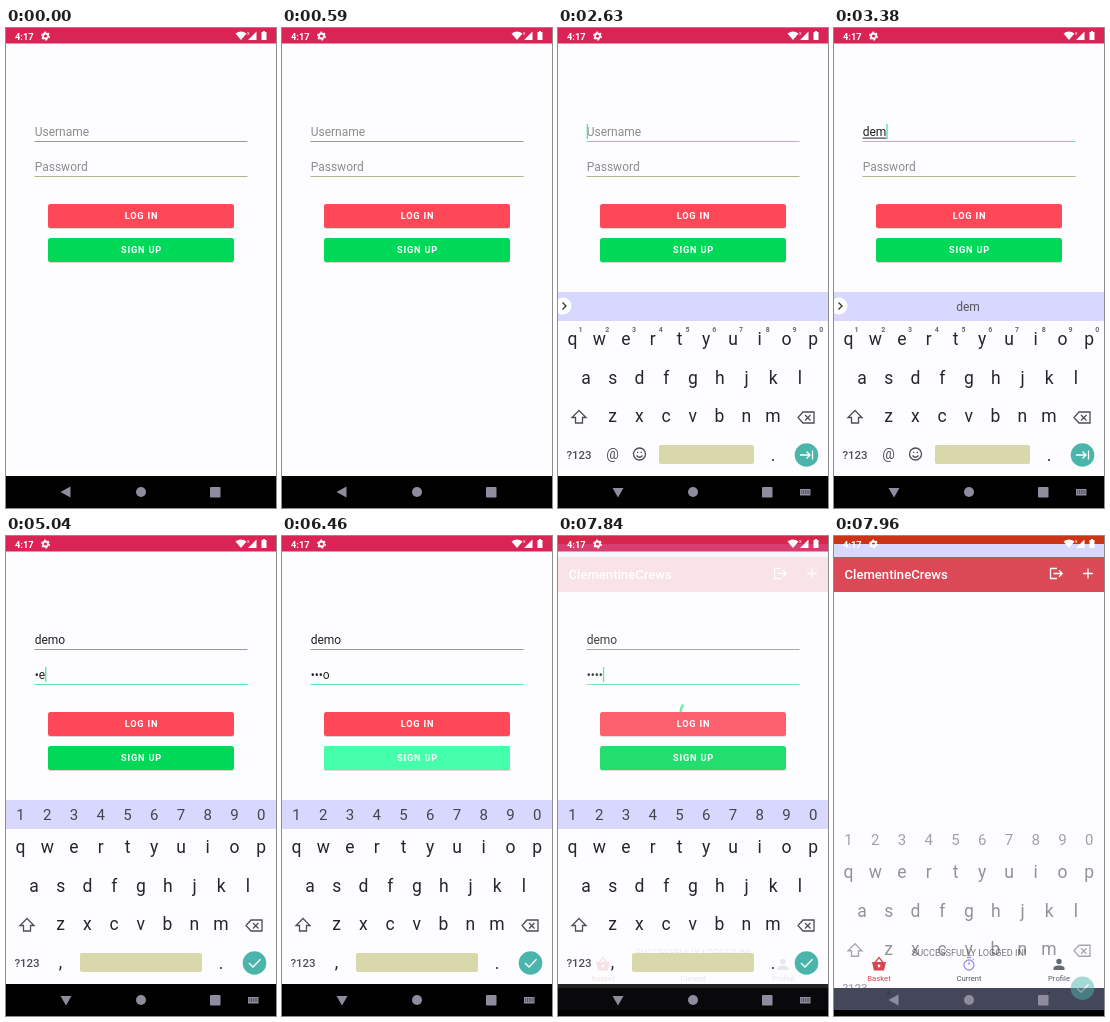
These frames come from a looping animation (270x480 px, 8000 ms). An HTML page:

```html
<!DOCTYPE html>
<html lang="en">
<head>
<meta charset="utf-8">
<title>Log in</title>
<style>
html, body { margin: 0; height: 100%; overflow: hidden; background: #fdfdff; }
svg { display: block; width: 100vw; height: 100vh; font-family: Roboto, Arial, sans-serif; }
.mid { text-anchor: middle; }
.bold { font-weight: 500; }
.line { fill: none; stroke-width: 1.3; }
.field { font-size: 12px; }
.button { font-size: 9.2px; font-weight: 700; letter-spacing: .82px; fill: #fff; }
.key { font-size: 17.5px; fill: #23262b; }
.digit { font-size: 15px; fill: #43444e; }
.hint { font-size: 7px; font-weight: 700; fill: #666879; }
.tab { font-size: 7.7px; }
</style>
</head>
<body>
<svg viewBox="0 0 270 480">
  <defs><clipPath id="clip"><rect id="clipBox" width="270" height="448"/></clipPath></defs>

  <g id="login">
    <rect width="270" height="480" fill="#fdfdff"/>
    <rect width="270" height="15.5" fill="#da2456"/>
    <path id="spinner" fill="none" stroke="#5deaa2" stroke-width="2.6"/>
    <text id="user" class="field" x="28.7" y="108"/>
    <text id="pass" class="field" x="28.7" y="143"/>
    <rect id="userLine" x="28.5" y="113" width="213" height="1"/>
    <rect id="passLine" x="28.5" y="148" width="213" height="1"/>
    <rect id="composing" x="28.7" y="109.6" height="1" fill="#222"/>
    <rect id="caret" width="1.3" height="15" fill="#4fe39b"/>
    <g fill="#000" opacity=".14">
      <rect x="42" y="177" width="186" height="24" rx="2.5"/>
      <rect x="42" y="211" width="186" height="24" rx="2.5"/>
    </g>
    <rect x="42" y="176" width="186" height="24" rx="2.5" fill="#ff4857"/>
    <rect x="42" y="210" width="186" height="24" rx="2.5" fill="#00d957"/>
    <rect id="press" x="42" y="210" width="186" height="24" rx="2.5" fill="#45ffab"/>
    <text class="button mid" x="135.5" y="191.3">LOG IN</text>
    <text class="button mid" x="135.5" y="225.3">SIGN UP</text>
    <rect y="448" width="270" height="32"/>
  </g>

  <g id="home">
    <rect width="270" height="480" fill="#fdfdff"/>
    <rect width="270" height="8" fill="#cb3414"/>
    <rect y="8" width="270" height="13" fill="#d8d8fc"/>
    <rect y="21" width="270" height="35" fill="#da4955"/>
    <text class="bold" x="10.5" y="42.5" font-size="13.1" fill="#fff">ClementineCrews</text>
    <g class="line" stroke="#fff">
      <path d="M223 32.5H216.5V42.5H223M219.5 37.5H228M225 34.2L228.3 37.5 225 40.8M249 37.5H259M254 32.5V42.5"/>
    </g>
    <rect y="452" width="270" height="22" fill="#44465a"/>
    <rect y="474" width="270" height="6"/>
    <text class="mid" x="135" y="420" font-size="9.1" fill="#777">SUCCESSFULLY LOGGED IN!</text>
    <path d="M38 426H52L50 434.5H40Z" fill="#d84450"/>
    <path class="line" d="M41 426.500L45 421.500 49 426.500" stroke="#d84450"/>
    <circle cx="45" cy="430" r="1.4" fill="#fff"/>
    <path class="line" d="M133 421.5H137M135 426V429M139 424L140 423" stroke="#9696e8"/>
    <circle class="line" cx="135" cy="429" r="5" stroke="#9696e8"/>
    <circle cx="225" cy="425.500" r="2.7" fill="#666a75"/>
    <path d="M219.500 434V432C219.500 428.500 230.500 428.500 230.500 432V434Z" fill="#666a75"/>
    <text class="tab mid" x="45" y="445" fill="#d84450">Basket</text>
    <text class="tab mid" x="135" y="445" fill="#555a66">Current</text>
    <text class="tab mid" x="225" y="445" fill="#555a66">Profile</text>
  </g>

  <g clip-path="url(#clip)"><g id="keyboard">
    <rect id="strip" y="264" width="270" height="29" fill="#d8d8fe"/>
    <g id="letters"></g>
    <g class="line" stroke="#4b4e56">
      <path d="M21 382.500L28 389.500H24.500V395H17.500V389.500H14Z"/>
      <path d="M245 384H256V395H245L240 389.500ZM247 387L252.500 392.500M252.500 387L247 392.500"/>
    </g>
    <text class="mid bold" x="21" y="430.500" font-size="11.5" fill="#4b4e56">?123</text>
    <text class="key mid" x="215" y="433" fill="#4b4e56">.</text>
    <rect id="space" y="417" height="19" rx="2" fill="#d9d8ab"/>
    <circle cx="248.500" cy="427" r="11.8" fill="#4bb5ab"/>
    <g id="textMode">
      <g id="hints"></g>
      <circle cx="5" cy="278" r="8.500" fill="#fff"/>
      <path class="line" d="M4.500 274.500L8 278 4.500 281.500" stroke="#333"/>
      <text id="suggest" class="mid" x="134" y="282.500" font-size="12" fill="#55565e"/>
      <text class="mid" x="54.500" y="431" font-size="14" fill="#4b4e56">@</text>
      <g class="line" stroke="#4b4e56">
        <circle cx="81.500" cy="426" r="6"/>
        <path d="M78.500 427.500Q81.500 431 84.500 427.500M79 424.300H80.300M82.700 424.300H84"/>
      </g>
      <path class="line" d="M242 427H252M248.500 423.500L252 427 248.500 430.500M254.500 422.500V431.500" stroke="#fff" stroke-width="1.5"/>
    </g>
    <g id="passMode">
      <g id="digits"></g>
      <text class="key mid" x="54.500" y="432" fill="#4b4e56">,</text>
      <path class="line" d="M243 427L247 431 254.500 423.300" stroke="#fff"/>
    </g>
  </g></g>

  <g fill="#fff">
    <text x="9" y="11.500" font-size="9.300" font-weight="700">4:17</text>
    <circle cx="39.500" cy="8" r="2.500" fill="none" stroke="#fff" stroke-width="1.800"/>
    <circle cx="39.500" cy="8" r="3.800" fill="none" stroke="#fff" stroke-width="1.300" stroke-dasharray="2 1.980"/>
    <path d="M229.500 5.500Q235 1.500 240.500 5.500L235 12ZM242 12L250.500 3.500V12ZM255.500 4H257V3H259V4H260.500V12H255.500Z"/>
    <text x="241" y="7" font-size="5">x</text>
  </g>
  <g fill="#8f8c9f">
    <path id="back"/>
    <circle cx="135" cy="464" r="5"/>
    <rect x="204" y="459" width="10.500" height="10.500" rx=".8"/>
    <path id="keysIcon" d="M242 461H252.500V467.500H242Z"/>
    <path id="keysDots" d="M243.200 463H251.500M243.200 465H251.500" stroke="#000" stroke-width=".8" stroke-dasharray="1 .8"/>
  </g>
</svg>
<script>
const $ = id => document.getElementById(id);
const set = (id, attrs) => { for (const k in attrs) $(id).setAttribute(k, attrs[k]); };
const show = (id, on) => set(id, { opacity: +on });
const clamp = v => Math.max(0, Math.min(1, v));
const ramp = (t, from, to) => clamp((t - from) / (to - from));
const ease = v => { v = clamp(v); return v * v * (3 - 2 * v); };

const LOOP = 8000, WORD = 'demo';
const USER_KEYS = [2880, 3100, 3300, 3600], PASS_KEYS = [4640, 4950, 5300, 5700];
const USER_FOCUS = 2170, PASS_FOCUS = 4020, PASS_BOARD = 4120;
const LEAVE = 7860, SPIN = 6700, MASK = 1500;

const row = (chars, x, y, cls) => [...chars].map((c, i) =>
  `<text class="mid ${cls}" x="${x + i * 26.75}" y="${y}">${c}</text>`).join('');
$('letters').innerHTML = row('qwertyuiop', 14.5, 317, 'key') +
  row('asdfghjkl', 28, 355.5, 'key') + row('zxcvbnm', 54.5, 394, 'key');
$('hints').innerHTML = row('1234567890', 22.5, 304, 'hint');
$('digits').innerHTML = row('1234567890', 14.5, 283.5, 'digit');

const typed = (keys, t) => keys.filter(k => t >= k).length;

function field(id, value, label) {
  $(id).textContent = value || label;
  set(id, { fill: value ? '#222' : '#8c8c8c' });
}

function drawFields(t) {
  const n = typed(USER_KEYS, t), m = typed(PASS_KEYS, t);
  const inUser = t >= USER_FOCUS && t < PASS_FOCUS, inPass = t >= PASS_FOCUS;
  const user = WORD.slice(0, n);
  const lastShown = m && t < PASS_KEYS[m - 1] + MASK;
  const pass = lastShown ? '•'.repeat(m - 1) + WORD[m - 1] : '•'.repeat(m);
  field('user', user, 'Username');
  field('pass', pass, 'Password');
  set('userLine', { fill: inUser ? '#83ccd8' : '#9a9a94' });
  set('passLine', { fill: inPass ? '#62e6a4' : '#b3b28e' });

  const id = inPass ? 'pass' : 'user', value = inPass ? pass : user;
  const width = value ? $(id).getComputedTextLength() : 0;
  const since = Math.max(...[USER_FOCUS, PASS_FOCUS, ...USER_KEYS, ...PASS_KEYS].filter(k => k <= t));
  show('caret', (inUser || inPass) && (t - since) % 1000 < 500);
  set('caret', { x: 28.7 + width, y: inPass ? 131 : 96 });
  set('composing', { width: inUser ? width : 0 });
  $('suggest').textContent = user;
}

function drawKeyboard(t) {
  const leaving = t >= LEAVE, passMode = t >= PASS_BOARD;
  const open = leaving ? 1 - ramp(t, LEAVE, LEAVE + 200) : ease(ramp(t, 2340, 2600));
  set('keyboard', { opacity: open, transform: `translate(0 ${50 * (1 - open)})` });
  set('clipBox', { height: leaving ? 474 : 448 });
  show('textMode', !passMode);
  show('passMode', passMode);
  show('strip', !leaving);
  show('space', !leaving);
  set('space', passMode ? { x: 74, width: 122 } : { x: 101, width: 95 });

  const down = t >= 2340 && !leaving;
  set('back', { d: down ? 'M54.500 460H65.500L60 469.500Z' : 'M54.500 464L64.500 458.500V469.500Z' });
  show('keysIcon', down);
  show('keysDots', down);
}

function drawSpinner(t) {
  const s = t - SPIN, u = s / 1333 % 1;
  const turn = Math.floor(s / 1333) * .75 + s / 4444 - .437;
  const point = a => `${135 + 12 * Math.cos(a)} ${175.5 + 12 * Math.sin(a)}`;
  const from = turn + .75 * ease(u * 2 - 1), to = turn + .75 * ease(u * 2) + .03;
  show('spinner', s >= 0);
  set('spinner', { d: `M${point(from * 2 * Math.PI)}A12 12 0 ${+(to - from > .5)} 1 ${point(to * 2 * Math.PI)}` });
}

function draw(now) {
  const t = now % LOOP;
  drawFields(t);
  drawKeyboard(t);
  drawSpinner(t);
  show('press', ramp(t, 6380, 6440) - ramp(t, 6560, 6700));
  show('home', ramp(t, 7830, 7910));
  requestAnimationFrame(draw);
}
requestAnimationFrame(draw);
</script>
</body>
</html>
```
